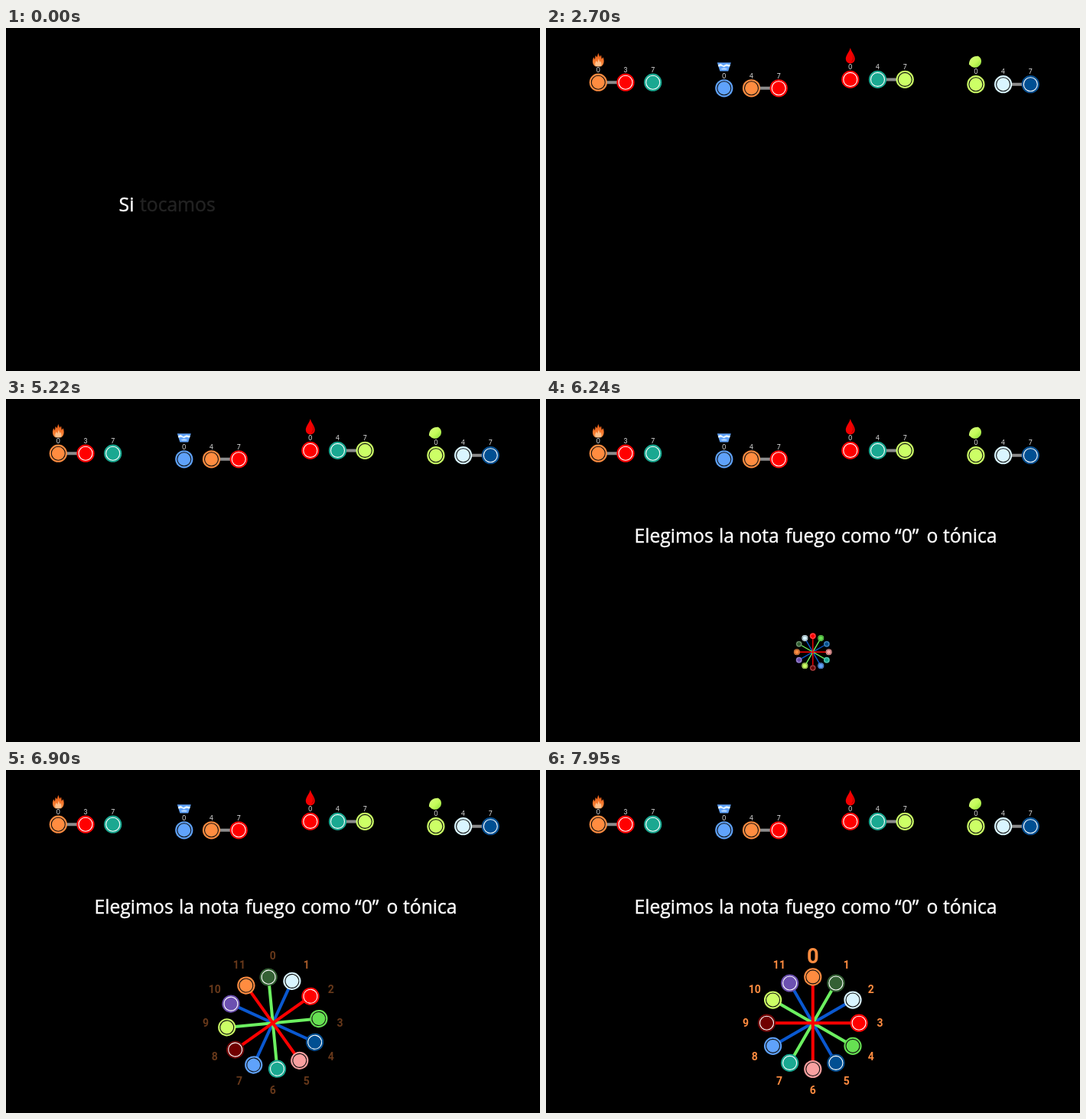
Write an HTML page that moves like this. It is 698 px wide and 449 px high and loops after 8 s.

```html
<!DOCTYPE html>
<html lang="es">
<head>
<meta charset="utf-8">
<title>Progresión de acordes</title>
<style>
  html, body { margin: 0; width: 100%; height: 100%; overflow: hidden; background: #000; }
  svg { display: block; width: 100vw; height: 100vh; }
  .line { font: 24.7px "Open Sans", "Noto Sans", sans-serif; fill: #fff; stroke: #fff; stroke-width: .4; }
  .small { font: 8.5px Lato, "Open Sans", sans-serif; fill: #e4e4e4; text-anchor: middle; }
  .num { font: bold 14px Roboto, Inter, sans-serif; fill: #ff8c40; text-anchor: middle; }
</style>
</head>
<body>
<svg id="stage" viewBox="0 0 698 449" preserveAspectRatio="none">
  <defs>
    <linearGradient id="leaf" x1="0" y1="0" x2="1" y2="1">
      <stop offset="0" stop-color="#d8ff80"/><stop offset=".55" stop-color="#c4fb58"/><stop offset="1" stop-color="#85d83a"/>
    </linearGradient>
    <linearGradient id="flame" x1="0" y1="0" x2="0" y2="1">
      <stop offset="0" stop-color="#e85a12"/><stop offset="1" stop-color="#ff8c40"/>
    </linearGradient>
  </defs>
  <rect width="698" height="449"/>
</svg>
<script>
const LOOP = 8000;
const stage = document.getElementById("stage");

const color = {
  orange: "#ff8c40", forest: "#346034", pale: "#d9f5ff", red: "#ff0000",
  green: "#66e052", navy: "#004f92", pink: "#f9a0a0", teal: "#1aa891",
  blue: "#5fa2fb", maroon: "#700000", lime: "#ccff66", purple: "#6c50b0"
};
const wheelOrder = Object.keys(color);
const whiteRing = new Set(["forest", "red", "navy", "teal", "maroon", "purple"]);

const icons = {
  fire: `<path fill="url(#flame)" d="M-4 -21C-8 -24 -8 -29 -6 -33L-4.5 -30L-3.5 -35.5L-1.7 -33L0 -38.5L2 -33.5L3.7 -36L4.5 -30.5L6.3 -33C8 -29 8 -24 4 -21Z"/>
    <path fill="#ffc08a" d="M-3 -21C-5.2 -24 -3.6 -26 -2.5 -28.5L-1 -26L.5 -31L2 -26.5L3 -28C4.6 -25 4.6 -23 3 -21Z"/>`,
  ice: `<path fill="#5fa2fb" d="M-9 -33.6H9L5.4 -22.3H-5.4Z"/>
    <path fill="#e6f5ff" d="M-8 -30.5L-4.5 -32L-1 -29.5L3 -31.5L8 -30.5L7.2 -28L3 -29L0 -27.5L-4 -29L-7.2 -28Z"/>
    <path fill="#bcdcff" d="M-4 -25.5L0 -26.5L4 -25.5L3 -24.3H-3Z"/>`,
  drop: `<path fill="#f40000" d="M0 -41.5C1.5 -36 6 -32 6 -27A6 6 0 0 1 -6 -27C-6 -32 -1.5 -36 0 -41.5Z"/>
    <path fill="#b80000" d="M1.8 -34C4 -30 4 -26 1 -23C5 -24 6 -29 1.8 -34Z"/>`,
  leaf: `<path fill="url(#leaf)" d="M-9 -26C-9 -33 -4 -37.5 3 -37C7 -35 8.3 -30 6 -26C3 -22 -1 -21 -4 -22.5C-6 -23 -7 -25 -9 -26Z"/>`
};

function el(tag, attrs, parent = stage, content = "") {
  const node = document.createElementNS("http://www.w3.org/2000/svg", tag);
  for (const k in attrs) node.setAttribute(k, attrs[k]);
  node.innerHTML = content;
  parent.append(node);
  return node;
}

function note(name, x, y, parent) {
  el("circle", { cx: x, cy: y, r: 11.6, fill: color[name] }, parent);
  el("circle", { cx: x, cy: y, r: 9, fill: "none", "stroke-width": 1.1,
    stroke: whiteRing.has(name) ? "#fff" : "#101010" }, parent);
}

function chord(start, x, y, icon, steps, names, linkFrom) {
  const gap = 35.7;
  const g = el("g", { transform: `translate(${x} ${y})` });
  el("g", {}, g, icons[icon]);
  el("path", { d: `M${linkFrom * gap} 0h${gap}`, stroke: "#8c8c8c", "stroke-width": 4 }, g);
  names.forEach((name, i) => {
    note(name, i * gap, 0, g);
    el("text", { class: "small", x: i * gap, y: -13.3 }, g, steps[i]);
  });
  return { g, start };
}

const chords = [
  chord(390, 68.3, 71.2, "fire", [0, 3, 7], ["orange", "red", "teal"], 0),
  chord(780, 232.8, 78.8, "ice", [0, 4, 7], ["blue", "orange", "red"], 1),
  chord(1110, 397.8, 67.4, "drop", [0, 4, 7], ["red", "teal", "lime"], 1),
  chord(1500, 561.9, 73.7, "leaf", [0, 4, 7], ["lime", "pale", "navy"], 1)
];

// Words fade in one after another, the whole line is cut at `end`.
function line(start, step, end, y, words, xs) {
  const g = el("g", { class: "line" });
  const parts = words.split(" ").map((w, i) => el("text", { x: xs[i], y }, g, w));
  return { start, step, end, parts };
}

const lines = [
  line(-109, 97, 2700, 240.3, "Si tocamos varios acordes seguidos", [147.6, 175, 281, 355, 450.5]),
  line(2830, 125, 5220, 240.3, "tenemos una progresión", [212.5, 319.5, 368.5]),
  line(5440, 88, LOOP, 188.3, "Elegimos la nota fuego como “0” o tónica",
    [115.5, 226, 252.3, 313, 386, 456, 497.5, 519])
];

const CX = 348.8, CY = 331.2, R = 60.3;
const polar = (i, r) => {
  const a = i * Math.PI / 6;
  return [r * Math.sin(a), -r * Math.cos(a)];
};

const wheel = el("g", {});
[[2, "#0a58d0"], [5, "#0a58d0"], [1, "#6cf060"], [4, "#6cf060"], [0, "#ff0000"], [3, "#ff0000"]]
  .forEach(([i, stroke]) => {
    const [x, y] = polar(i, R);
    el("path", { d: `M${x} ${y}L${-x} ${-y}`, stroke, "stroke-width": 4 }, wheel);
  });
wheelOrder.forEach((name, i) => note(name, ...polar(i, R), wheel));

const numbers = wheelOrder.map((_, i) => {
  const [x, y] = polar(i, 87.8);
  const g = el("g", {});
  el("text", { class: "num", y: 5 }, g, i);
  return { g, x: CX + x, y: CY + y };
});

const progress = (t, start, length) => Math.min(1, Math.max(0, (t - start) / length));
const easeOut = p => 1 - (1 - p) * (1 - p);
const easeInOut = p => (1 - Math.cos(Math.PI * p)) / 2;

function draw(t) {
  for (const c of chords) c.g.setAttribute("visibility", t >= c.start ? "visible" : "hidden");

  for (const l of lines) {
    l.parts.forEach((w, i) => {
      const shown = t < l.end ? progress(t, l.start + i * l.step, l.step) : 0;
      w.setAttribute("opacity", shown);
    });
  }

  const size = easeOut(progress(t, 6150, 475));
  const turn = -90 + 90 * easeInOut(progress(t, 6560, 600));
  wheel.setAttribute("visibility", size > 0 ? "visible" : "hidden");
  wheel.setAttribute("transform", `translate(${CX} ${CY}) rotate(${turn}) scale(${size})`);

  const grow = 1 + 0.95 * easeInOut(progress(t, 7160, 450));
  numbers.forEach((n, i) => {
    n.g.setAttribute("transform", `translate(${n.x} ${n.y}) scale(${i ? 1 : grow})`);
    n.g.setAttribute("opacity", progress(t, i === 1 ? 6705 : 6780, 300));
  });
}

const begin = performance.now();
function tick() {
  draw((performance.now() - begin) % LOOP);
  requestAnimationFrame(tick);
}
draw(0);
requestAnimationFrame(tick);
</script>
</body>
</html>
```
